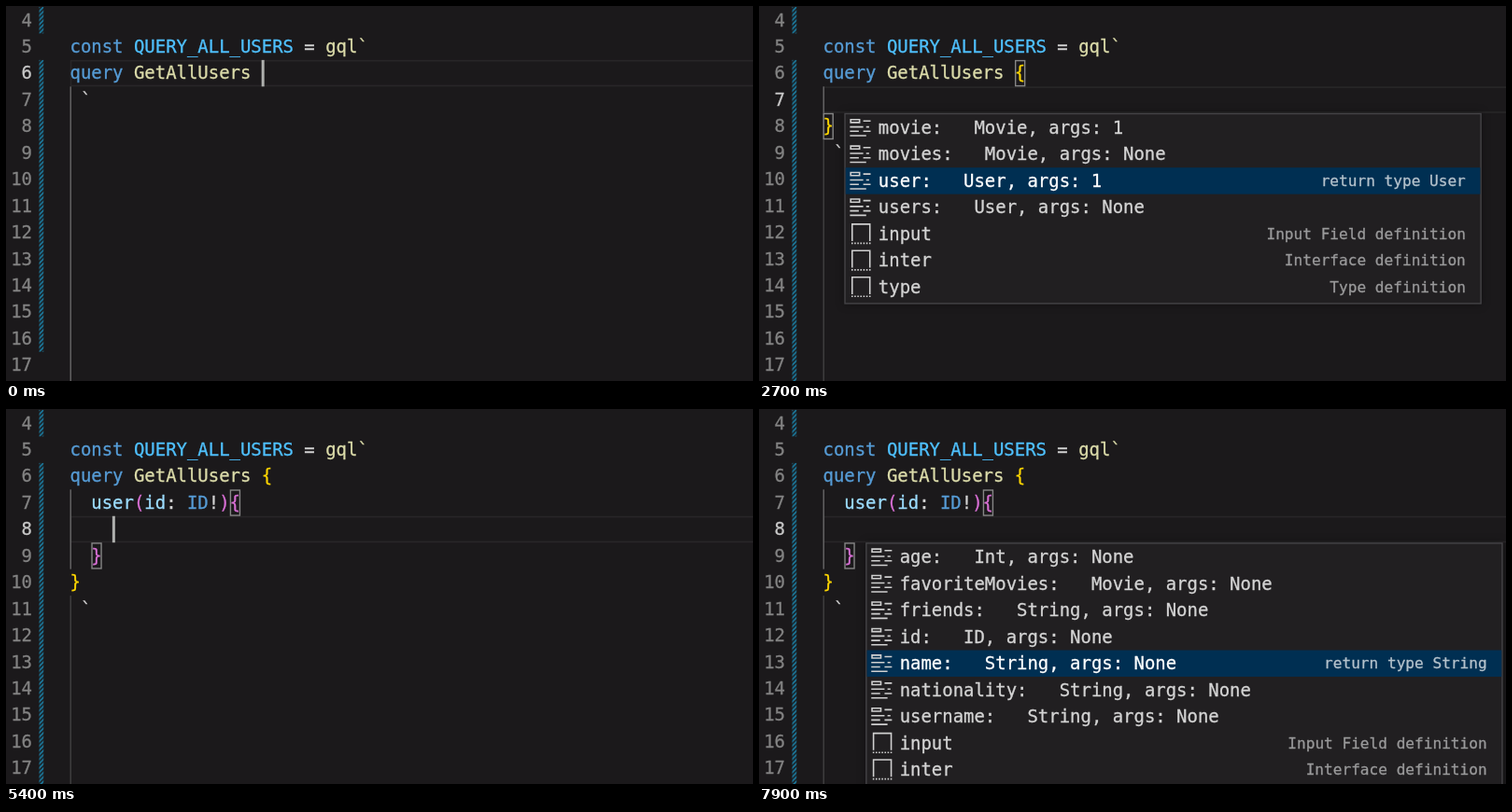
An HTML page that plays this animation: 800x402 px, repeating every 8000 ms.

```html
<!DOCTYPE html>
<html lang="en">
<head>
<meta charset="utf-8">
<title>Query autocompletion</title>
<style>
  html, body { margin: 0; width: 100%; height: 100%; overflow: hidden; background: #1b191b; }
  svg { display: block; width: 800px; height: 402px; }
  text { font: 18.96px "DejaVu Sans Mono", monospace; white-space: pre; color: #d4d4d4; }
  text, tspan { fill: currentColor; stroke: currentColor; stroke-width: .3; }
  .num { color: #838383; text-anchor: end; }
  .on { color: #c8c8c8; }
  .detail { font-size: 16.12px; text-anchor: end; color: #9a9a9b; }
  .sel { color: #fff; }
  .detail.sel { color: #b5c2cc; }
  .icon { fill: none; stroke: #d0d0d0; stroke-width: 1; }
  .match { fill: none; stroke: #868686; stroke-width: 1.4; }
  .menu { fill: #211f21; stroke: #454447; stroke-width: 1.4; filter: drop-shadow(0 0 5px rgba(0, 0, 0, .36)); }
</style>
</head>
<body>
<svg viewBox="0 0 800 402">
  <defs>
    <pattern id="hatch" x="35.5" y="1" width="4.74" height="4.74" patternUnits="userSpaceOnUse">
      <path d="M-1 1l2-2M0 4.74l4.74-4.74M3.74 5.74l2-2" stroke="#1b81a8" stroke-width="1.68"/>
    </pattern>
  </defs>
  <g id="code"></g>
  <rect id="cursor" width="3" height="28.44" fill="#aeafad"/>
  <g id="menu"></g>
</svg>
<script>
const LOOP = 8000, LINE = 28.44, CHAR = 11.415, LEFT = 68.5, FIRST = 4, LAST = 17;
const $ = id => document.getElementById(id);
const rowTop = row => 1 + (row - FIRST) * LINE;
const left = col => LEFT + col * CHAR;

const colors = {
  const: '#569cd6', query: '#569cd6', ID: '#569cd6',
  QUERY_ALL_USERS: '#4fc1ff', GetAllUsers: '#dcdcaa', 'gql`': '#dcdcaa',
  user: '#9cdcfe', id: '#9cdcfe'
};
const open = 'query GetAllUsers {', field = '  user(id: ID!)';

// time, cursor row, cursor column, lines from row 6 on, matched brackets
const edits = [
  [0, 6, 18, ['query GetAllUsers '], []],
  [500, 6, 19, [open + '}'], [[6, 18], [6, 19]]],
  [1000, 7, 2, [open, '', '}'], [[6, 18], [8, 0]]],
  [2900, 7, 15, [open, field, '}'], [[7, 6], [7, 14]]],
  [4700, 7, 16, [open, field + '{}', '}'], [[7, 15], [7, 16]]],
  [5400, 8, 4, [open, field + '{', '', '  }', '}'], [[7, 15], [9, 2]]]
];

const snippets = ['input|Input Field definition', 'inter|Interface definition', 'type|Type definition'];
const queries = ['movie:   Movie, args: 1', 'movies:   Movie, args: None',
  'user:   User, args: 1', 'users:   User, args: None', ...snippets];
const fields = ['age:   Int, args: None', 'favoriteMovies:   Movie, args: None',
  'friends:   String, args: None', 'id:   ID, args: None', 'name:   String, args: None',
  'nationality:   String, args: None', 'username:   String, args: None', ...snippets];

// time, menu items, selected index
const menus = [
  [0], [1200, queries, 0], [1900, queries, 1], [2300, queries, 2], [2900],
  [5600, fields, 0], [7200, fields, 1], [7500, fields, 2], [7700, fields, 3], [7900, fields, 4]
];

const rect = (x, y, w, h, attrs) => `<rect x="${x}" y="${y}" width="${w}" height="${h}" ${attrs}/>`;
const text = (x, y, cls, s) => `<text x="${x}" y="${y}" class="${cls}">${s}</text>`;

function highlight(line) {
  const bracket = line.startsWith('  ') ? '#da70d6' : '#ffd700';
  return line.replace(/QUERY_ALL_USERS|GetAllUsers|gql`|const|query|ID|user|id|[{}()]/g,
    m => `<tspan style="color:${colors[m] || bracket}">${m}</tspan>`);
}

function drawCode([, row, , lines, matches]) {
  const tick = 6 + lines.length;
  const end = tick > 7 ? 402 : rowTop(LAST);
  const guide = (from, to, color) =>
    rect(LEFT, rowTop(from), 1.5, rowTop(to) - rowTop(from), `fill="${color}"`);
  const stripe = (y, h) => rect(35.5, y, 4.74, h, 'fill="url(#hatch)"');
  let out = stripe(1, LINE) + stripe(rowTop(6), end - rowTop(6))
    + rect(LEFT + 1, rowTop(row) + .8, 740, LINE - 1.6, 'fill="none" stroke="#282628" stroke-width="1.6"');
  out += tick > 7
    ? guide(7, tick - 1, '#626162') + guide(tick, 19, '#3e3d3e')
    : guide(7, 19, '#626162');
  const all = ['', 'const QUERY_ALL_USERS = gql`', ...lines, ' `'];
  for (let n = FIRST; n <= LAST; n++) {
    const base = rowTop(n) + 20.6;
    out += text(28, base, n === row ? 'num on' : 'num', n);
    if (all[n - FIRST]) out += text(LEFT, base, '', highlight(all[n - FIRST]));
  }
  for (const [r, c] of matches) {
    out += rect(left(c) + .7, rowTop(r) + .7, CHAR - 1.4, LINE - 1.4, 'class="match"');
  }
  return out;
}

function drawMenu([, items, chosen], [, row, col]) {
  if (!items) return '';
  const x = left(col), y = rowTop(row + 1), w = 682.5;
  let out = rect(x + .7, y + .7, w - 1.4, items.length * LINE + 4.4, 'class="menu"');
  items.forEach((item, i) => {
    const t = y + 1.58 + i * LINE, sel = i === chosen ? 'sel' : '';
    const [label, hint] = item.split('|');
    const note = hint || (sel && 'return type ' + label.match(/: +(\w+)/)[1]);
    if (sel) out += rect(x + 1.4, t, w - 2.8, LINE, 'fill="#002f52"');
    const shape = hint
      ? '<path d="M2.5 13V1.5h12V13"/><path d="M2 14.5h13" stroke-dasharray="1"/>'
      : '<path d="M1.5 2.5h6v2h-6zM10 3.5h5M1 7.5h9M12 7.5h2M1 10.5h6M10 10.5h5M1 13.5h11"/>';
    out += `<g class="icon" transform="translate(${x + 4.5} ${t + 1.4}) scale(1.58)">${shape}</g>`
      + text(x + 36.5, t + 20.7, sel, label);
    if (note) out += text(x + w - 17, t + 19.7, 'detail ' + sel, note);
  });
  return out;
}

const latest = (steps, t) => steps.findLast(s => s[0] <= t);
let edit, menu;

function frame() {
  const t = performance.now() % LOOP;
  const nextEdit = latest(edits, t), nextMenu = latest(menus, t);
  if (nextEdit !== edit) {
    edit = nextEdit;
    $('code').innerHTML = drawCode(edit);
    $('cursor').setAttribute('x', left(edit[2]) - .3);
    $('cursor').setAttribute('y', rowTop(edit[1]));
  }
  if (nextMenu !== menu) {
    menu = nextMenu;
    $('menu').innerHTML = drawMenu(menu, edit);
  }
  // the caret blinks from the latest edit on
  $('cursor').style.opacity = (t - edit[0]) % 1000 < 500 ? 1 : 0;
  requestAnimationFrame(frame);
}
frame();
</script>
</body>
</html>
```
